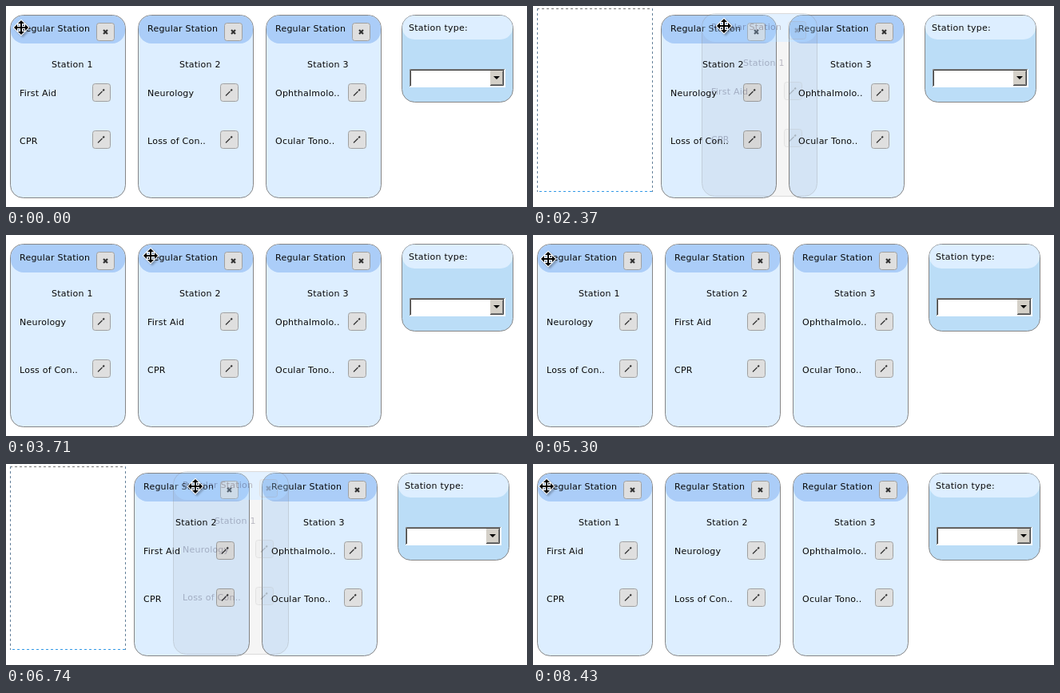
An HTML page that plays this animation: 652x252 px, repeating every 8.83 s.

```html
<!DOCTYPE html>
<html lang="en">
<head>
<meta charset="utf-8">
<title>Reordering stations</title>
<style>
  html, body { margin: 0; width: 100%; height: 100%; overflow: hidden; background: #fff; }
  svg { display: block; }
  text { font: 11px "DejaVu Sans", Verdana, sans-serif; letter-spacing: .23px; fill: #080808; white-space: pre; }
  .body { fill: #def; stroke: #868686; }
  .head { fill: #abcdf8; }
  .button { fill: #dfdfdf; stroke: #a0a0a0; }
  .ghost { opacity: .3; }
  .ghost .body { fill: #0002; }
  .ghost .button { fill: #0001; }
  .ghost .head { fill: #a4d2ff; }
  .ghost text { fill: #1c1838; }
  #slot path { fill: none; stroke-dasharray: 3; }
  #cursor { filter: drop-shadow(2px 2px 1px #0004); }
</style>
</head>
<body>
<svg width="652" height="252" viewBox="0 0 652 252">
  <g id="panel">
    <rect x=".5" y=".5" width="139" height="109" rx="16" fill="#bbddf7" stroke="#868686"/>
    <rect x="1" y="1" width="138" height="30" rx="15" fill="#def"/>
    <text x="9" y="20">Station type:</text>
    <rect x="10" y="68" width="120" height="23" fill="#fff"/>
    <path d="M10.5 90V68.5H129" fill="none" stroke="#808080"/>
    <path d="M11.5 89V69.5H128" fill="none" stroke="#404040"/>
    <rect x="111" y="70" width="17" height="19" fill="#d4d0c8"/>
    <path d="M111 88.500H127.500V70" fill="none" stroke="#404040"/>
    <path d="M112 87.500H126.500V71" fill="none" stroke="#808080"/>
    <path d="M115 77H123L119 81Z"/>
  </g>
  <g id="stack"></g>
  <g id="slot">
    <path d="M0 .5H145" stroke="#777"/>
    <path d="M.5 0V230M144.500 0V230" stroke="#64809a"/>
    <path d="M0 229.500H145" stroke="#3399e6" stroke-dashoffset="3"/>
  </g>
  <path id="cursor" stroke="#fff" stroke-width="2" paint-order="stroke"
    d="M-1-1V-5H-4L0-9 4-5H1V-1H5V-4L9 0 5 4V1H1V5H4L0 9-4 5H-1V1H-5V4L-9 0-5-4V-1Z"/>
</svg>
<script>
const LOOP = 8830, STEP = 60, TOP = 11;
const $ = id => document.getElementById(id);
const stack = $('stack'), slot = $('slot'), cursor = $('cursor'), panel = $('panel');

// Pointer moves: start, end, x, y reached. It rests between them.
const moves = [
  [0, 0, 19, 27],
  [1530, 2490, 261, 25], [2620, 2860, 246, 27], [2860, 3220, 196, 26], [3220, 3580, 181, 26],
  [4040, 4340, 100, 35], [4340, 4700, 21, 29], [5240, 5300, 19, 30],
  [5900, 6860, 259, 28], [6990, 7590, 173, 26.5], [7590, 7710, 125, 37], [7710, 8430, 17, 28]
];

const drags = [
  { start: 1000, swap: 2620, drop: 3710, gripY: 16.4 },
  { start: 5900, swap: 6990, drop: 7590, gripY: 19 }
];

const button = (x, y, icon) => `<g transform="translate(${x} ${y})">
  <rect class="button" x=".5" y=".5" width="22" height="22" rx="3"/>${icon}</g>`;
const cross = '<path d="M9 9L14 14M14 9L9 14" stroke="#333" stroke-width="2.2"/>';
const pencil = `<path d="M7 15.500L12.500 10" stroke="#333" stroke-width="1.2"/>
  <path d="M13.300 9.200L15 7.500" stroke="#333" stroke-width="2"/>`;

function makeCard(number, first, second) {
  const g = document.createElementNS('http://www.w3.org/2000/svg', 'g');
  g.innerHTML = `<rect class="body" x=".5" y=".5" width="144" height="229" rx="16"/>
    <rect class="head" x="1" y="1" width="143" height="35" rx="16"/>
    <text x="12" y="21">Regular Station</text>
    <text class="title" x="52" y="66">Station ${number}</text>
    <text x="12" y="102">${first}</text>
    <text x="12" y="162">${second}</text>`
    + button(108, 10, cross) + button(103, 86, pencil) + button(103, 145, pencil);
  stack.append(g);
  return g;
}

const third = makeCard(3, 'Ophthalmolo..', 'Ocular Tono..');
const cards = [makeCard(1, 'First Aid', 'CPR'), makeCard(2, 'Neurology', 'Loss of Con..')];

const place = (el, x, y) =>
  el.setAttribute('transform', `translate(${Math.round(x)} ${Math.round(y)})`);

function setCard(card, number, x, y = TOP) {
  card.querySelector('.title').textContent = 'Station ' + number;
  place(card, x, y);
}

// Mostly steady, with a soft start and end
const ease = u => .6 * u + .4 * u * u * (3 - 2 * u);

const moveAt = t => moves.findLastIndex(m => m[0] <= t);

// The screen refreshes every STEP ms while the pointer moves.
function refreshTime(t) {
  const [start, end] = moves[moveAt(t)];
  return Math.min(end, start + Math.floor((t - start) / STEP) * STEP);
}

function pointer(t) {
  const i = moveAt(Math.max(0, t));
  const [start, end, x, y] = moves[i];
  const [, , x0, y0] = moves[Math.max(0, i - 1)];
  const k = ease(Math.min(1, (t - start) / Math.max(1, end - start)));
  return i ? [x0 + (x - x0) * k, y0 + (y - y0) * k] : [x, y];
}

function draw(t) {
  const shown = refreshTime(t);
  const turn = t < 4040 ? 0 : 1;
  const { start, swap, drop, gripY } = drags[turn];
  const moved = cards[turn], other = cards[1 - turn];
  const dropped = t >= drop, swapped = t >= swap;
  const dragging = t >= start && !dropped;
  const shift = dragging ? 5 : 0;

  place(third, 325 - shift, TOP);
  place(panel, 495 - shift, TOP);
  setCard(other, dropped ? 1 : 2, swapped ? 5 : 165 - shift);
  if (dragging) {
    const [x, y] = pointer(shown - STEP); // the card trails by one refresh
    setCard(moved, 1, x - 14, y - gripY);
  } else {
    setCard(moved, dropped ? 2 : 1, dropped ? 165 : 5);
  }
  moved.classList.toggle('ghost', dragging);
  other.classList.remove('ghost');
  if (stack.lastChild !== moved) stack.append(moved);

  slot.style.display = dragging ? '' : 'none';
  place(slot, swapped ? 165 : 5, 3);
  place(cursor, ...pointer(shown));
}

const origin = performance.now();
function tick() {
  draw((performance.now() - origin) % LOOP);
  requestAnimationFrame(tick);
}
tick();
</script>
</body>
</html>
```
